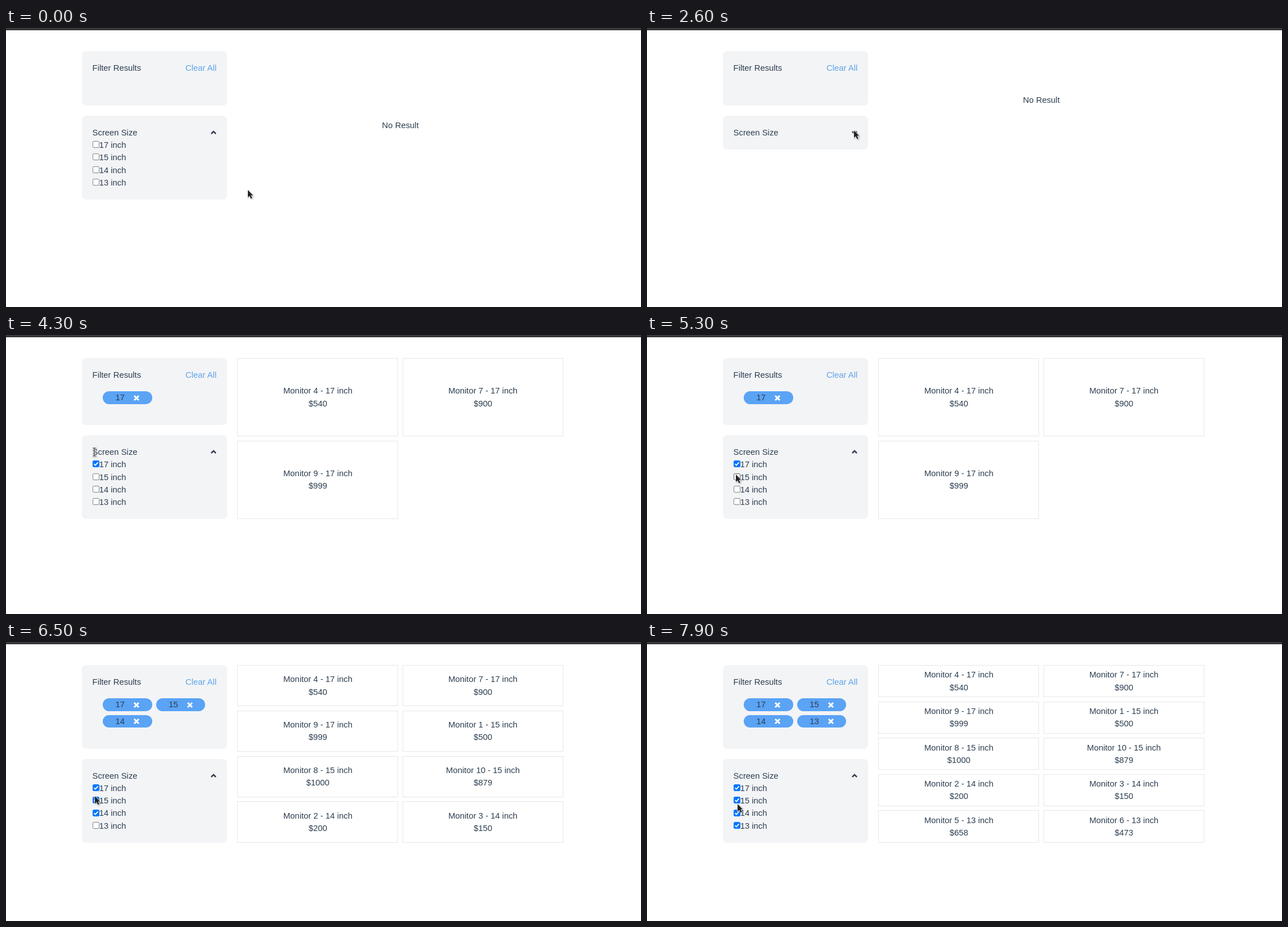
An HTML page for the animation above (8 s loop, 1129 px wide and 496 px high).

```html
<!DOCTYPE html>
<html lang="en">
<head>
<meta charset="utf-8">
<title>Monitor filter</title>
<style>
  * { box-sizing: border-box; }
  html { font-size: 14.857px; }
  html, body { margin: 0; width: 100%; height: 100%; overflow: hidden; }
  body {
    position: relative;
    background: #fff;
    color: #2c3e50;
    font: 1rem/1.5 "Liberation Sans", Arial, sans-serif;
    cursor: default;
  }
  svg { display: block; overflow: visible; fill: none; }
  .bar {
    height: 4px;
    background: #3b393c;
    border-bottom: 1px solid #2b2226;
  }
  main {
    position: absolute;
    left: 135px;
    top: 41px;
    display: flex;
    gap: 1.25rem;
  }
  aside { width: 17.36rem; }
  .panel {
    padding: 1.25rem;
    border-radius: .5rem;
    background: #f3f4f6;
  }
  .panel + .panel { margin-top: 1.25rem; }
  .head { display: flex; justify-content: space-between; }
  .clear { color: #5ea4e8; }
  .chips {
    display: flex;
    flex-wrap: wrap;
    gap: .5rem;
    padding: 1.25rem;
  }
  .chip {
    display: flex;
    justify-content: space-between;
    align-items: center;
    width: 5.885rem;
    padding: 0 1.5rem;
    border-radius: 1rem;
    background: #5aa3f5;
  }
  .chip svg { width: 10px; height: 10px; stroke: #fff; stroke-width: 3; }
  .chevron {
    width: 10px;
    height: 8px;
    margin-top: 7px;
    stroke: #2c3e50;
    stroke-width: 2.5;
  }
  .closed .chevron { transform: scaleY(-1); }
  .closed .option { display: none; }
  .option { display: flex; align-items: center; }
  .box {
    width: .8125rem;
    height: .8125rem;
    margin-top: -2px;
    stroke: #767676;
  }
  .box rect { fill: #fff; }
  .box path { stroke: none; stroke-width: 2; }
  .box.hover { stroke: #4f4f4f; }
  .box.on { stroke: #0075ff; }
  .box.on.hover { stroke: #005cc8; }
  .box.on rect { fill: #0075ff; }
  .box.on.hover rect { fill: #005cc8; }
  .box.on path { stroke: #fff; }
  .results {
    width: 39rem;
    display: grid;
    grid-template-columns: 1fr 1fr;
    grid-auto-rows: 1fr;
    gap: .5rem;
  }
  .card, .none {
    display: flex;
    flex-direction: column;
    align-items: center;
    justify-content: center;
  }
  .card { border: 1px solid #e5e7eb; }
  .none { grid-column: span 2; }
  #pointer {
    position: absolute;
    left: 0;
    top: 0;
    width: 1px;
    height: 1px;
    filter: drop-shadow(1px 1px 1px rgba(0, 0, 0, .3));
  }
  .arrow { fill: #222; stroke: #fff; stroke-width: 1.4; paint-order: stroke; stroke-linejoin: round; }
  .halo { stroke: #fff; stroke-width: 2.8; }
  .beam { stroke: #222; stroke-width: 1.2; }
</style>
</head>
<body>
<div class="bar"></div>
<main>
  <aside>
    <div class="panel">
      <div class="head"><span>Filter Results</span><span class="clear">Clear All</span></div>
      <div class="chips" id="chips"></div>
    </div>
    <div class="panel" id="sizes">
      <div class="head">
        <span>Screen Size</span>
        <svg class="chevron" viewBox="0 0 10 8"><path d="M.9 6 5 1.9 9.1 6"/></svg>
      </div>
    </div>
  </aside>
  <div class="results" id="results"></div>
</main>
<svg id="pointer">
  <path class="arrow" d="M0 0V13.2L3.1 10.4 5.5 15.4 7.8 14.3 5.5 9.5H9.4Z"/>
  <g class="text">
    <path class="halo" d="M-3.5-7H3.5M0-7V7M-3.5 7H3.5"/>
    <path class="beam" d="M-3-7H3M0-7V7M-3 7H3"/>
  </g>
</svg>
<script>
const LOOP = 8000, TICK = 100;
const START = [430, 288];

// Pointer bursts: first tick, last tick, then the points passed on the way
const MOVES = [
  [100, 400, [427, 279], [423, 270], [427, 280], [432, 289]],
  [600, 1400, [438, 235], [385, 153], [220, 176], [154, 204]],
  [1500, 1800, [200, 196], [285, 180], [368, 177], [358, 181]],
  [2000, 2000, [359, 182]],
  [2200, 2400, [368, 182]],
  [3600, 4000, [250, 200], [155, 206]],
  [4100, 4300, [157, 208]],
  [4600, 5100, [155, 222], [157, 247]],
  [5300, 5300, [158, 248]],
  [5700, 5800, [159, 289]],
  [5900, 6000, [158, 274]],
  [6700, 6900, [160, 295]],
  [7100, 7200, [160, 315]],
  [7400, 7400, [160, 322]],
  [7800, 7900, [161, 288]]
];
const CLOSE = 2600, OPEN = 3300;
const BEAM_ON = 4200, BEAM_OFF = 4700;

const SIZES = [
  { inch: 17, at: 4200, items: [[4, 540], [7, 900], [9, 999]] },
  { inch: 15, at: 5600, items: [[1, 500], [8, 1000], [10, 879]] },
  { inch: 14, at: 6300, items: [[2, 200], [3, 150]] },
  { inch: 13, at: 7700, items: [[5, 658], [6, 473]] }
];

const $ = id => document.getElementById(id);
const sizes = $('sizes'), chips = $('chips'), results = $('results'), pointer = $('pointer');
const [arrow, beam] = pointer.children;

sizes.insertAdjacentHTML('beforeend', SIZES.map(s => `
  <div class="option">
    <svg class="box" viewBox="0 0 13 13">
      <rect x=".5" y=".5" width="12" height="12" rx="2"/>
      <path d="M2.8 6.7 5.3 9.2 10.2 3.6"/>
    </svg>${s.inch} inch
  </div>`).join(''));
const boxes = [...sizes.querySelectorAll('.box')];

const chip = s => `<div class="chip">${s.inch}
  <svg viewBox="0 0 10 10"><path d="M1 1 9 9M9 1 1 9"/></svg></div>`;
const card = (s, [id, price]) => `<div class="card">
  <span>Monitor ${id} - ${s.inch} inch</span><span>$${price}</span></div>`;

function pointerAt(t) {
  let from = START;
  for (const [first, last, ...points] of MOVES) {
    if (t < first) break;
    if (t < last) {
      const path = [from, ...points];
      const u = (t - first + TICK) / (last - first + TICK) * points.length;
      const i = Math.floor(u), a = path[i], b = path[i + 1];
      return a.map((v, k) => v + (b[k] - v) * (u - i));
    }
    from = points[points.length - 1];
  }
  return from;
}

function render(t) {
  const picked = SIZES.filter(s => t >= s.at);
  chips.innerHTML = picked.map(chip).join('');
  results.innerHTML = picked.flatMap(s => s.items.map(item => card(s, item))).join('')
    || '<div class="none">No Result</div>';
  sizes.classList.toggle('closed', t >= CLOSE && t < OPEN);

  const [x, y] = pointerAt(t);
  pointer.style.transform = `translate(${Math.round(x)}px, ${Math.round(y)}px)`;
  const overText = t >= BEAM_ON && t < BEAM_OFF;
  arrow.style.display = overText ? 'none' : '';
  beam.style.display = overText ? '' : 'none';

  boxes.forEach((box, i) => {
    const r = box.getBoundingClientRect();
    const hover = x >= r.left - 1 && x < r.right && y >= r.top && y < r.bottom;
    box.classList.toggle('on', t >= SIZES[i].at);
    box.classList.toggle('hover', hover);
  });
}

const begin = performance.now();
let shown = -1;
function frame() {
  const t = Math.floor((performance.now() - begin) % LOOP / TICK) * TICK;
  if (t !== shown) render(shown = t);
  requestAnimationFrame(frame);
}
frame();
</script>
</body>
</html>
```
